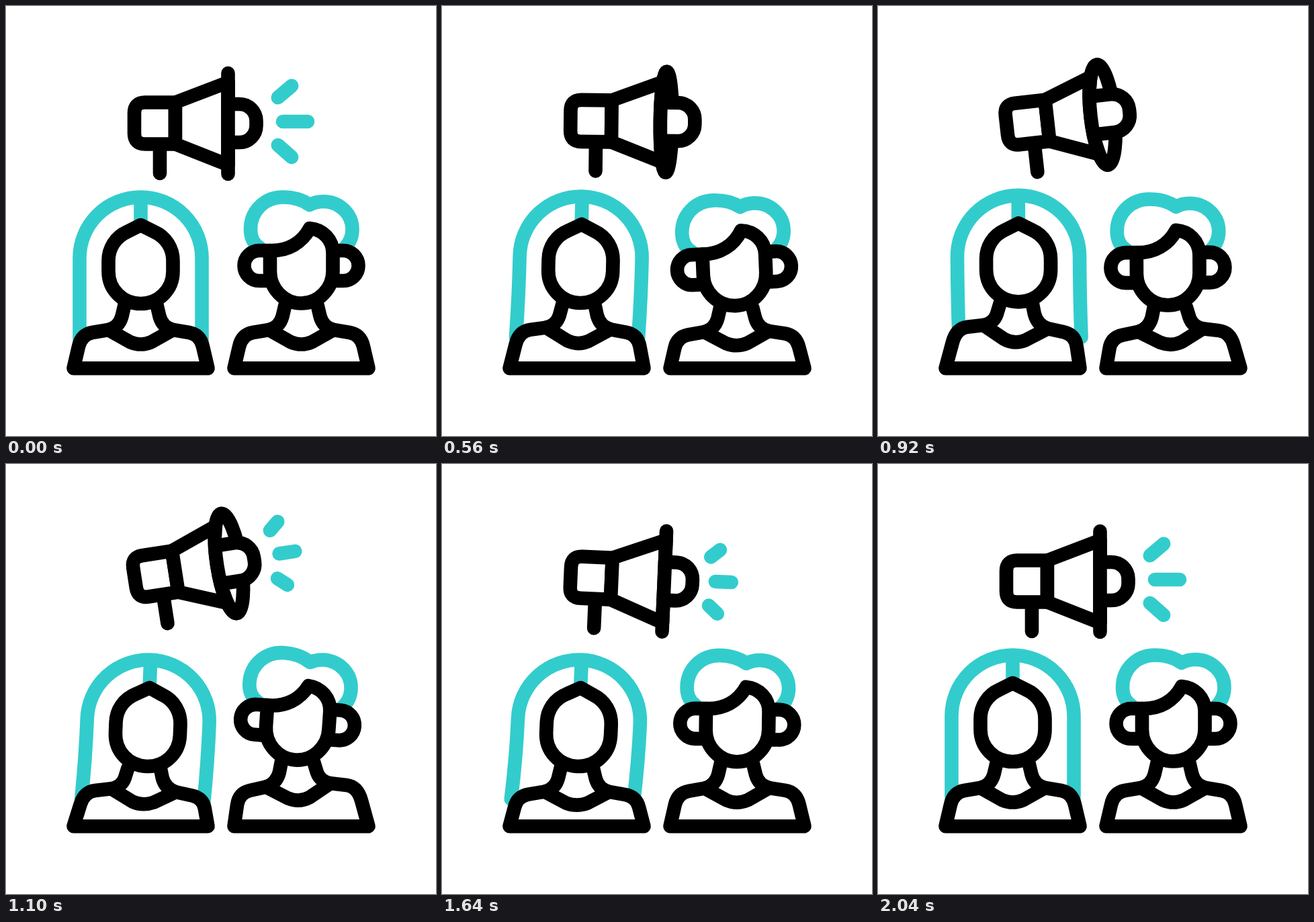
An HTML page with a canvas that plays this animation: 640 px wide and 640 px high, repeating every 2.36 s.

```html
<!DOCTYPE html>
<html lang="en">
<head>
<meta charset="utf-8">
<title>Announcement</title>
<style>
html, body { margin: 0; width: 100%; height: 100%; overflow: hidden; background: #fff; }
canvas { display: block; width: 640px; height: 640px; }
</style>
</head>
<body>
<canvas id="stage"></canvas>
<script>
const LOOP = 2360, STEP = 20, SIZE = 640;
const INK = '#000', TEAL = '#33cccc', LINE = 20.6;
const canvas = document.getElementById('stage');
const ctx = canvas.getContext('2d');
const ratio = window.devicePixelRatio || 1;
canvas.width = canvas.height = SIZE * ratio;

// Monotone cubic curve through [time, value] pairs, flat outside them.
function track(...keys) {
  const n = keys.length;
  const slope = i => (keys[i + 1][1] - keys[i][1]) / (keys[i + 1][0] - keys[i][0]);
  const tangent = keys.map((_, i) => {
    if (i === 0 || i === n - 1) return 0;
    const a = slope(i - 1), b = slope(i);
    return a * b <= 0 ? 0 : 2 * a * b / (a + b);
  });
  return t => {
    if (t <= keys[0][0]) return keys[0][1];
    if (t >= keys[n - 1][0]) return keys[n - 1][1];
    let i = 0;
    while (t > keys[i + 1][0]) i++;
    const [t0, v0] = keys[i], [t1, v1] = keys[i + 1];
    const h = t1 - t0, u = (t - t0) / h, u2 = u * u, u3 = u2 * u;
    return v0 * (2 * u3 - 3 * u2 + 1) + v1 * (3 * u2 - 2 * u3) +
      h * (tangent[i] * (u3 - 2 * u2 + u) + tangent[i + 1] * (u3 - u2));
  };
}

// Track over the shared beats of the motion, resting at both ends.
const BEATS = [360, 740, 1100, 1340, 1640];
function beats(rest, values, ...extra) {
  const keys = [[200, rest], ...BEATS.map((t, i) => [t, values[i]]), ...extra, [2040, rest]];
  return track(...keys.sort((a, b) => a[0] - b[0]));
}

const horn = {
  x: beats(191, [191.4, 191.3, 191.6, 191.5, 191.4]),
  y: beats(175, [180.3, 168.8, 169.8, 180.4, 168.6],
    [600, 170], [865, 179], [1290, 169.5], [1840, 168]),
  tilt: beats(0, [2.7, -2.5, -8.8, -7, 2.5]),
  mouth: beats(139.5, [139.5, 145, 142, 142, 139.5]),
  open: beats(0, [0, 17, 18, 6, 0]),
  nose: beats(181.5, [181.5, 188, 180, 181, 181.5])
};

const ray = {
  clock: track([200, 150], [360, 330], [740, 720], [1100, 1170], [1340, 1435], [1640, 1710], [2040, 1770]),
  period: 540,
  shift: track([0, -24], [90, -12], [150, 0], [180, 10.5], [330, 27], [355, 38], [410, 48]),
  length: track([40, 0], [90, 24], [150, 37], [180, 37], [330, 15.5], [355, 15], [400, 0])
};

const woman = {
  x: 200.5, y: 443,
  dx: beats(0, [-0.2, 8.8, 8.6, 7.5, 0.5]),
  dy: beats(0, [-7, 4, 7, -7, 7], [870, -4]),
  tilt: beats(0, [-1.5, 3.6, 2.2, -1.5, 2.5], [870, -0.5]),
  sway: beats(0, [4.5, -9.5, -4, 5, -5], [870, 3])
};

const man = {
  x: 439.5, y: 442.5,
  dx: beats(0, [0, -5.3, -9.3, -5.2, -1]),
  dy: beats(0, [-1.3, 7.8, -2, 2, 0.7]),
  tilt: beats(0, [0, -4.4, 3.9, -4.4, 0.8])
};

function stroke(path, color = INK) {
  ctx.strokeStyle = color;
  ctx.stroke(path instanceof Path2D ? path : new Path2D(path));
}

function shape(d) {
  const path = new Path2D(d);
  ctx.fillStyle = '#fff';
  ctx.fill(path);
  stroke(path);
}

function placed(x, y, degrees, draw) {
  ctx.save();
  ctx.translate(x, y);
  ctx.rotate(degrees * Math.PI / 180);
  draw();
  ctx.restore();
}

function drawRays(t, mouth) {
  const s = ray.clock(t) % ray.period;
  const d = ray.shift(s), size = ray.length(s) / 37;
  if (size < 0.02) return;
  const dash = (x, y, hx, hy) => {
    hx *= size;
    hy *= size;
    stroke(`M${mouth + x - hx},${y - hy}L${mouth + x + hx},${y + hy}`, TEAL);
  };
  dash(84.5 + 0.84 * d, -47.5 - 0.22 * d, 10.2, -8.7);
  dash(100 + d, -3, 18.5, 0);
  dash(84.5 + 0.84 * d, 41 + 0.18 * d, 10.2, 9);
}

function drawHorn(t) {
  placed(horn.x(t), horn.y(t), horn.tilt(t), () => {
    const m = horn.mouth(t), w = horn.open(t), b = horn.nose(t);
    const edge = m - 0.62 * w, flare = 61.5 - 0.2 * w, left = m - 0.9 * w;
    drawRays(t, m);
    stroke('M38,36V74');
    shape('M61,-31.5H16Q0,-31.5 0,-15.5V14.5Q0,30.5 16,30.5H61Z');
    shape(`M61,-31.5L${edge},${-flare}V${flare}L61,30.5Z`);
    if (w >= 1) {
      shape(`M${m},-75A${w},75 0 0 1 ${m},75A${w},75 0 0 1 ${m},-75Z`);
    }
    shape(`M${left},-29H${b - 25}A25,25 0 0 1 ${b},-4V3A25,25 0 0 1 ${b - 25},28H${left}`);
    stroke(w < 1 ? `M${m},-75V75` : `M${m},75A${w},75 0 0 1 ${m},-75`);
  });
}

// The base stays put while collar and shoulders follow the head.
function drawBody(cx, dx, dy) {
  const bx = 0.5 * dx, by = 0.85 * dy - 0.5 * Math.abs(bx), lean = 0.012 * bx;
  const p = (x, y) => {
    const k = Math.min(1, (539.2 - y) / 50);
    return `${cx + x + bx * k},${y + (by + lean * x) * k} `;
  };
  shape(`M${p(-100, 539.2)}L${p(-92.5, 507)}Q${p(-88.5, 489)}${p(-72, 486)}L${p(-48, 482)}` +
    `L${p(-16, 500)}Q${p(0, 507)}${p(16, 500)}L${p(48, 482)}` +
    `L${p(72, 486)}Q${p(88.5, 489)}${p(92.5, 507)}L${p(100, 539.2)}Z`);
  for (const side of [-1, 1]) {
    stroke(`M${cx + 24 * side + 0.6 * dx},${445 + dy}` +
      `L${cx + 28 * side + bx},${462 + (dy + by) / 2}` +
      `Q${p(32.5 * side, 478)}${p(48 * side, 482)}`);
  }
}

function drawWoman(t) {
  const dx = woman.dx(t), dy = woman.dy(t), tilt = woman.tilt(t), e = woman.sway(t);
  const x = woman.x + dx, y = woman.y + dy;
  placed(x, y, tilt, () => {
    stroke(`M${-91 + e},53Q-91,-10 -91,-68A91,90.5 0 0 1 91,-68Q91,-10 ${91 + e},53`, TEAL);
    stroke('M0,-156V-117', TEAL);
  });
  drawBody(woman.x, dx, dy);
  placed(x, y, tilt, () => {
    shape('M0,-117L20,-107C38,-99 48,-82 48,-64V-48C48,-21 27,0 0,0' +
      'C-27,0 -48,-21 -48,-48V-64C-48,-82 -38,-99 -20,-107Z');
  });
}

function drawMan(t) {
  const dx = man.dx(t), dy = man.dy(t);
  drawBody(man.x, dx, dy);
  placed(man.x + dx, man.y + dy, man.tilt(t), () => {
    stroke('M-62,-83C-72,-89 -75.5,-100 -75.5,-110C-75.5,-138 -54,-158 -27.5,-158' +
      'C-11,-158 2,-154 12.5,-146.5C19,-150 26,-151.5 32.5,-151.5' +
      'C57,-151.5 76,-133 76,-110C76,-100 73,-91 65,-83', TEAL);
    shape('M-46.5,-78.5H-62.5A22.5,22.5 0 0 0 -85,-56A22.5,22.5 0 0 0 -62.5,-33.5H-46.5');
    shape('M47,-78.5H62.5A22.5,22.5 0 0 1 85,-56A22.5,22.5 0 0 1 62.5,-33.5H47');
    shape('M-46.5,-78.5C-20,-77.5 1,-90 12.5,-111.5C32,-110 47,-95 47,-75V-48' +
      'C47,-22 26,0 0,0C-26,0 -46.5,-22 -46.5,-47Z');
  });
}

function draw(t) {
  ctx.setTransform(ratio, 0, 0, ratio, 0, 0);
  ctx.fillStyle = '#fff';
  ctx.fillRect(0, 0, SIZE, SIZE);
  ctx.lineWidth = LINE;
  ctx.lineCap = ctx.lineJoin = 'round';
  drawHorn(t);
  drawWoman(t);
  drawMan(t);
}

const start = performance.now();
function tick() {
  const t = (performance.now() - start) % LOOP;
  draw(Math.floor(t / STEP) * STEP);
  requestAnimationFrame(tick);
}
tick();
</script>
</body>
</html>
```
